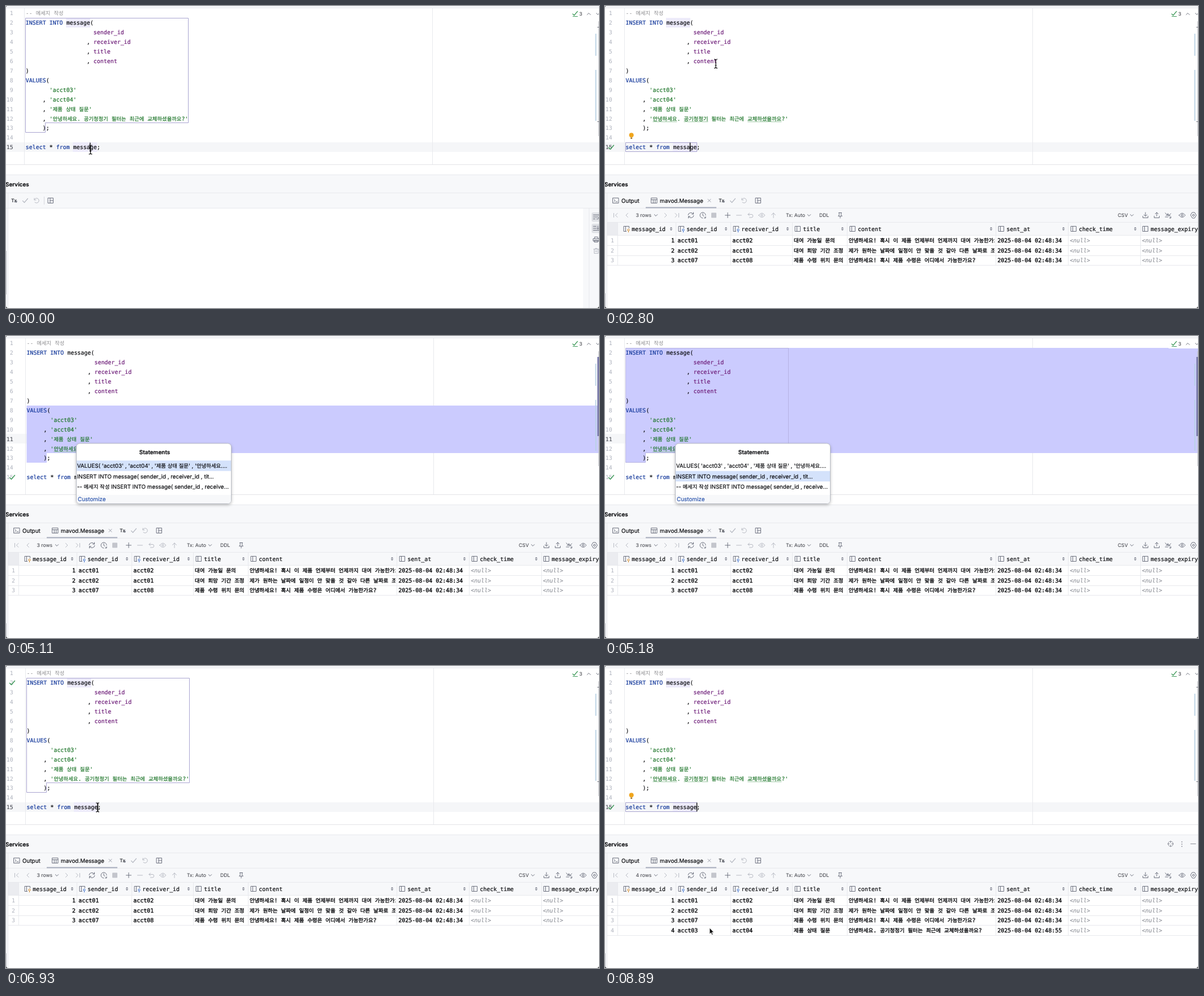
Write an HTML page that moves like this. It is 1049 px wide and 534 px high and loops after 8960 ms.

```html
<!DOCTYPE html>
<html lang="ko">
<head>
<meta charset="utf-8">
<title>SQL console</title>
<style>
html, body { margin: 0; width: 100%; height: 100%; overflow: hidden; background: #fff; }
svg { display: block; position: absolute; left: 0; top: 0; }
text {
  white-space: pre; text-rendering: geometricPrecision; color: #0c0d10;
  fill: currentColor; stroke: currentColor; stroke-width: .2px;
  font: 9.967px "DejaVu Sans Mono", monospace;
}
.ui { font: 9.9px Inter, sans-serif; }
.small { font: 8.7px Inter, sans-serif; color: #33353c; stroke-width: 0; }
.bold { font: 600 9.9px Inter, sans-serif; }
.ko { font-family: "Noto Sans CJK KR", "Noto Sans CJK JP", sans-serif; font-size: 9.35px; }
.cells text { stroke-width: .38px; }
.cells .ko { font-size: 9.45px; }
.kw { color: #12379a; }
.str { color: #1d7529; }
.col { color: #6d1c78; }
text.com { color: #8b8b8e; stroke-width: 0; }
text.num { color: #aeb2bd; stroke-width: 0; }
.now { color: #53565f; }
text.null { color: #8d9098; font-style: italic; stroke-width: .1px; }
.link { color: #2d56ae; }
.end { text-anchor: end; }
.mid { text-anchor: middle; }
</style>
</head>
<body>
<svg width="1049" height="534" viewBox="0 0 1049 534">
  <g id="scene"></g>
  <g id="pointer"></g>
</svg>
<script>
const LOOP = 8960, TICK = 70, CW = 6, HANGUL = 8.6;
const PANEL = '#f7f8fa', EDGE = '#e8e9ed', DARK = '#6c707e', DIM = '#b7bac3', GREEN = '#3f9a5a';
const SELECTED = '#cbcbfe', LILAC = '#edebfa', FRAME = '#a9a4d0';

const rowTop = n => 4 + (n - 1) * 16.93;
const rowEdge = n => Math.round(rowTop(n));
const rect = (x, y, w, h, fill, more = '') =>
  `<rect x="${x}" y="${y}" width="${w}" height="${h}" fill="${fill}" ${more}/>`;
const hline = (x, y, w, c = EDGE) => rect(x, y, w, 1, c);
const vline = (x, y, h, c = EDGE) => rect(x, y, 1, h, c);
const rich = s => s.replace(/&/g, '&amp;').replace(/</g, '&lt;')
  .replace(/[가-힣]+/g, '<tspan class="ko">$&</tspan>');
const text = (x, y, s, cls = '', more = '') => `<text x="${x}" y="${y}" class="${cls}" ${more}>${rich(s)}</text>`;
const icon = (x, y, d, c = DARK, w = 1, fill = 'none') =>
  `<path transform="translate(${x} ${y})" d="${d}" fill="${fill}" stroke="${c}" stroke-width="${w}" stroke-linecap="round" stroke-linejoin="round"/>`;

const ICON = {
  check: 'M-4.5 .5L-1.5 3.5L4.5 -3.5',
  undo: 'M-4 -4V-1H-1M-4 -1.2A4.2 4.2 0 1 1 -3 3',
  back: 'M-2 -4L-4.5 -1.5L-2 1M-4.5 -1.5H1.5A2.6 2.6 0 0 1 1.5 4H-2',
  layout: 'M-4.5 -4.5H4.5V4.5H-4.5ZM-1 -4.5V4.5M-1 0H4.5',
  table: 'M-5 -4.5H5V4.5H-5ZM-5 -1.5H5M-1.7 -1.5V4.5M1.7 -1.5V4.5',
  output: 'M-5 -4.5H5V4.5H-5ZM-3 -2L-1 0L-3 2M0 2H3',
  close: 'M-2.5 -2.5L2.5 2.5M2.5 -2.5L-2.5 2.5',
  down: 'M-2.7 -1.3L0 1.4L2.7 -1.3',
  up: 'M-3 1.5L0 -1.5L3 1.5',
  prev: 'M1.5 -3.5L-2 0L1.5 3.5',
  next: 'M-1.5 -3.5L2 0L-1.5 3.5',
  first: 'M-3.5 -3.5V3.5M3 -3.5L-.5 0L3 3.5',
  last: 'M3.5 -3.5V3.5M-3 -3.5L.5 0L-3 3.5',
  reload: 'M-5 -.5A5 4.6 0 0 1 4 -2.6M4.5 -5V-2H1.5M5 .5A5 4.6 0 0 1 -4 2.6M-4.5 5V2H-1.5',
  clock: 'M5 0A5 5 0 1 0 0 5M0 -3V.5L2 1.5M3 5H5V3Z',
  plus: 'M-4.5 0H4.5M0 -4.5V4.5',
  minus: 'M-4.5 0H4.5',
  eye: 'M-5.5 0Q0 -7.5 5.5 0Q0 7.5 -5.5 0ZM-1.7 0A1.7 1.7 0 1 0 1.7 0A1.7 1.7 0 1 0 -1.7 0',
  arrow: 'M0 4.5V-4M-3.5 -.5L0 -4L3.5 -.5',
  pin: 'M-2.5 -4.5H2.5M-1.8 -4.5V-.5L-3.5 1.5H3.5L1.8 -.5V-4.5M0 1.5V5',
  load: 'M0 -5V1.5M-2.7 -1L0 1.7L2.7 -1M-4.5 1.5V4.5H4.5V1.5',
  send: 'M0 1.5V-5M-2.7 -2.3L0 -5L2.7 -2.3M-4.5 1.5V4.5H4.5V1.5',
  swap: 'M-5 -4L-.5 0M-.5 -3V0H-3.5M5 -3L1 1M1 -2V1H4M-5 3H0M3 5H5V3Z',
  gear: 'M-2 -5H2L5 0L2 5H-2L-5 0ZM-1.7 0A1.7 1.7 0 1 0 1.7 0A1.7 1.7 0 1 0 -1.7 0',
  target: 'M-4.5 0A4.5 4.5 0 1 0 4.5 0A4.5 4.5 0 1 0 -4.5 0M0 -5V-2M0 5V2M-5 0H-2M5 0H2',
  column: 'M-4.5 -4.5H4.5V4.5H-4.5ZM-1.5 -4.5V4.5',
  sort: 'M-1.5 -1.2L0 -2.7L1.5 -1.2ZM-1.5 1.2L0 2.7L1.5 1.2Z',
  wrap: 'M-5 -3.5H5M-5 0H3.5A2 2 0 0 1 3.5 3.5H1M-5 3.5H-2',
  scroll: 'M-5 -3.5H0M-5 0H0M-5 3.5H5M3 -4V1.5M1 -.5L3 1.5L5 -.5',
  print: 'M-3 -1.5V-4.5H3V-1.5M-5 -1.5H5V2.5H-5ZM-3 1H3V4.5H-3Z',
  trash: 'M-4.5 -3H4.5M-1.5 -3V-4.5H1.5V-3M-3.5 -3V4.5H3.5V-3M-1 -.5V2M1 -.5V2'
};

const TITLE = '제품 상태 질문', BODY = '안녕하세요. 공기청정기 필터는 최근에 교체하셨을까요?';
const CODE = [
  [1, 0, '-- 메세지 작성', 'com'],
  [2, 0, 'INSERT INTO', 'kw'], [2, 12, 'message('],
  [3, 20, 'sender_id', 'col'],
  [4, 18, ','], [4, 20, 'receiver_id', 'col'],
  [5, 18, ','], [5, 20, 'title', 'col'],
  [6, 18, ','], [6, 20, 'content', 'col'],
  [7, 0, ')'],
  [8, 0, 'VALUES', 'kw'], [8, 6, '('],
  [9, 7, "'acct03'", 'str'],
  [10, 5, ','], [10, 7, "'acct04'", 'str'],
  [11, 5, ','], [11, 7, `'${TITLE}'`, 'str'],
  [12, 5, ','], [12, 7, `'${BODY}'`, 'str'],
  [13, 5, ');'],
  [15, 0, 'select', 'kw'], [15, 7, '*'], [15, 9, 'from', 'kw'], [15, 14, 'message;']
];
const SCRIPT = '-- 메세지 작성 INSERT INTO message( sender_id , receive...';
const MENU = {
  insert: [`VALUES( 'acct03' , 'acct04' , '${TITLE}' , '안녕하세요....`,
    'INSERT INTO message( sender_id , receiver_id , tit...', SCRIPT],
  select: ['select * from message', SCRIPT]
};
const COLUMNS = [
  [33, 'message_id', 117, 'key'], [130, 'sender_id', 214, 'key'], [227, 'receiver_id', 323, 'key'],
  [336, 'title', 420], [433, 'content', 683], [696, 'sent_at', 811], [824, 'check_time', 938], [951, 'message_expiry']
];
const ROWS = [
  ['acct01', 'acct02', '대여 가능일 문의', '안녕하세요! 혹시 이 제품 언제부터 언제까지 대여 가능한가요?', '34'],
  ['acct02', 'acct01', '대여 희망 기간 조정', '제가 원하는 날짜에 일정이 안 맞을 것 같아 다른 날짜로 조정', '34'],
  ['acct07', 'acct08', '제품 수령 위치 문의', '안녕하세요! 혹시 제품 수령은 어디에서 가능한가요?', '34'],
  ['acct03', 'acct04', TITLE, BODY, '55']
];

// Each step changes only the named parts of the state.
const END_1 = 114, END_2 = 126, IN_TITLE = 7 * CW + CW + 4 * HANGUL + CW;
const STEPS = [
  [0, { dx: 0, row: 15, box: 'insert', caret: END_1, sel: '', menu: '', pick: 0, tick: 0, rows: 0, bulb: 0, hover: 0 }],
  [140, { box: 'select' }],
  [700, { bulb: 1 }],
  [980, { caret: 0 }],
  [1260, { bulb: 0, box: '', sel: 'select', menu: 'select', menuX: 149 }],
  [1680, { menu: '' }],
  [1750, { sel: '', box: 'select', caret: END_1 }],
  [1960, { dx: 1.7, rows: 3, tick: 15 }],
  [2240, { caret: 0 }],
  [2590, { bulb: 1 }],
  [2800, { caret: END_1 }],
  [3290, { caret: 0 }],
  [3850, { caret: END_1 }],
  [4130, { row: 11, caret: IN_TITLE, bulb: 0 }],
  [5110, { box: '', sel: 'values', menu: 'insert', menuX: 124.5, caret: 0 }],
  [5180, { sel: 'insert', pick: 1 }],
  [5670, { menu: '', pick: 0 }],
  [5740, { sel: '', box: 'insert', tick: 2, caret: IN_TITLE }],
  [6650, { row: 15, caret: END_2 }],
  [7280, { box: '', sel: 'select', menu: 'select', menuX: 162, caret: 0 }],
  [7910, { menu: '' }],
  [7980, { sel: '', box: 'select', caret: END_2, tick: 0 }],
  [8120, { tick: 15, rows: 4 }],
  [8540, { hover: 1 }],
  [8680, { bulb: 1 }]
];

// Pointer runs: shape, end time, then [time, x, y] points.
const RUNS = [
  ['beam', 280, [0, 149.5, 254]],
  ['beam', 1260, [980, 100, 187]],
  ['beam', 4550, [2800, 196, 102], [3360, 160, 150], [3850, 126, 178]],
  ['beam', 7280, [6300, 126, 180], [6580, 162, 250]],
  ['arrow', LOOP, [8470, 162, 300], [8680, 182, 476], [8820, 185, 463]]
];
const CLICKS = [[4130, 4410], [6650, 6860]];

function outline(x, kind) {
  const d = kind === 'insert' ? `M${x} 21.5H${x + 288}V206.5H${x + 35}V223.5H${x}Z` : `M${x} 241.5H${x + 126}V257.5H${x}Z`;
  return `<path d="${d}" fill="none" stroke="${FRAME}"/>`;
}

function selection(x, kind) {
  if (kind === 'select') return rect(x, 241, 126, 17, SELECTED) + outline(x, kind);
  const top = rowEdge(kind === 'insert' ? 2 : 8);
  return rect(x, top, 1049 - x, 207 - top, SELECTED) + rect(x, 207, 35.5, 17, SELECTED) +
    (kind === 'insert' ? `<g opacity=".6">${outline(x, kind)}</g>` : '');
}

function editor(s) {
  const x0 = 34.7 + s.dx, left = Math.floor(x0) + .5, shift = Math.round(s.dx);
  const mark = (row, col, len) => rect(x0 + col * CW - .5, rowEdge(row), len * CW + 1, 17, LILAC);
  let out = rect(0, rowEdge(s.row), 1049, 17, '#f5f6f8');
  out += vline(32 + shift, 4, 276) + vline(754 + shift, 4, 276);
  if (s.row === 15) out += mark(2, 12, 7) + mark(15, 14, 7);
  else if (!s.sel) out += mark(5, 20, 5);
  if (s.sel) out += selection(left, s.sel);
  for (let n = 1; n <= 15; n++)
    out += text(12.8, rowTop(n) + 12.3, String(n), 'end ' + (n === s.row ? 'now' : 'num'));
  for (const [row, col, str, cls] of CODE) out += text(x0 + col * CW, rowTop(row) + 12.3, str, cls);
  if (s.box !== 'insert')
    for (const [x, n] of [[48, 5], [103, 5], [215.8, 7]]) out += rect(x0 + x, 204.4, n * HANGUL, .8, '#83b98b');
  if (s.box) out += outline(left, s.box);
  if (s.tick) out += icon(11, rowTop(s.tick) + 8.8, ICON.check, GREEN, 1.5);
  if (s.bulb) out += `<circle cx="${45 + s.dx}" cy="228.3" r="4" fill="#f0a51c"/>` + rect(43.5 + s.dx, 232.4, 3, 2.6, '#a17b3a');
  if (s.caret) out += rect(x0 + s.caret - .5, rowTop(s.row) + .6, 1.3, 15.6, '#000');
  return out + stripe(s);
}

function stripe(s) {
  let out = s.menu ? rect(997, 4, 52, 18, '#fff') : '';
  out += icon(1005.5, 14, 'M-3 0L-.5 2.5L5.5 -4.5M-2.5 4.5H5.5', GREEN, 1.2);
  out += text(1014, 17.3, '3', 'small') + icon(1031, 14, ICON.up) + icon(1047, 14, ICON.down);
  out += rect(1042.5, 49, 1.8, 39, '#b9d2e4') + rect(1042.5, 113, 1.8, 90, '#b9d2e4') + vline(1048, 27, 203, '#c6c7cb');
  if (s.sel === 'insert' || s.sel === 'values') return out + rect(1046, 37, 3, 140, '#7f80ad');
  return out + (s.row === 15 ? hline(1046, 37, 3, '#777a83') + hline(1046, 204, 3, '#777a83') : hline(1046, 75, 3, '#9a94cf'));
}

function services(s) {
  let out = hline(0, 280, 1049, '#e3e4e8') + rect(0, 298, 1049, 60, PANEL);
  for (const y of [298, 330, 357]) out += hline(0, y, 1049);
  out += text(-1, 318.6, 'Services', 'bold');
  if (s.hover) {
    const soft = '#8b8e98';
    out += icon(1000.5, 314.5, ICON.target, soft) + icon(1040.5, 314.5, ICON.minus, soft);
    for (const y of [311, 315, 319]) out += `<circle cx="1020.5" cy="${y}" r=".9" fill="${soft}"/>`;
  }
  const x = s.rows ? 192 : 0;
  out += text(x + 9, 347, 'Tx', 'small', 'style="font-weight:600"') + icon(x + 18, 345, 'M-1 2H1V0Z');
  out += icon(x + 34, 344, ICON.check, DIM, 1.2) + icon(x + 54, 344, ICON.undo, DIM) + icon(x + 79, 344, ICON.layout);
  return out + (s.rows ? tabs() + grid(s.rows) : blank());
}

function blank() {
  let out = vline(67, 337, 14, '#d6d8de') + rect(0, 358, 3, 176, PANEL) + vline(3, 331, 203);
  out += rect(1021, 358, 28, 176, PANEL) + vline(1031, 358, 176) + rect(0, 433, 1, 77, '#c3c5ca');
  for (const y of [365, 385]) out += rect(1036, y, 18, 16.5, '#dfe1e5', 'rx="3"');
  return out + icon(1044, 373, ICON.wrap) + icon(1044, 393, ICON.scroll) +
    icon(1044, 413, ICON.print) + icon(1044, 433, ICON.trash, DIM);
}

function tabs() {
  return icon(19, 344, ICON.output) + text(29, 347.6, 'Output', 'ui') +
    icon(87, 344, ICON.table) + text(97, 347.6, 'mavod.Message', 'ui') +
    icon(184.5, 344, ICON.close, '#9a9daa') + rect(72, 355.5, 125, 2, '#a8adbd');
}

function toolbar(count) {
  const set = (c, list) => list.map(([x, name]) => icon(x, 370, ICON[name], c)).join('');
  return rect(4, 358, 1045, 24, PANEL) +
    set(DIM, [[19, 'first'], [39, 'prev'], [107, 'next'], [127, 'last'], [237, 'minus'], [257.5, 'back'], [277.5, 'eye'], [298, 'arrow']]) +
    set(DARK, [[90, 'down'], [152, 'reload'], [173, 'clock'], [217, 'plus'], [361, 'down'], [416, 'pin'], [932, 'down'],
      [956, 'load'], [976, 'send'], [996, 'swap'], [1021, 'eye'], [1041, 'gear']]) +
    rect(188, 365.5, 9, 9, '#c3c5cc', 'rx="1"') + text(54.5, 373.2, count + ' rows', 'small') +
    text(320, 373.2, 'Tx: Auto', 'small') + text(379, 373.2, 'DDL', 'small') + text(907, 373.2, 'CSV', 'small');
}

function grid(count) {
  const bottom = 405 + count * 17.8;
  let out = toolbar(count) + rect(0, 358, 3, 176, PANEL) + vline(3, 331, 203) + rect(0, 508, 1, 26, '#c3c5ca');
  out += rect(4, 382, 1045, 23, PANEL) + rect(4, 383, 19, 22, '#ebecf0') + hline(4, 382, 1045);
  for (let i = 0; i <= count; i++) out += hline(4, Math.round(405 + i * 17.8), 1045);
  for (const x of [22, 125, 222, 331, 428, 691, 819, 947]) out += vline(x, 382, bottom - 382);
  COLUMNS.forEach(([x, name, sort, key], i) => {
    out += icon(x + 5, 394, ICON.column);
    if (key) out += rect(x + 5, 393, 7, 7, PANEL) + icon(x + 8.5, 396, 'M-1.7 0A1.7 1.7 0 1 0 1.7 0A1.7 1.7 0 1 0 -1.7 0M0 1.8V4', i ? '#4878d0' : '#d8943a');
    out += text(x + 14.2, 397.8, name);
    if (sort) out += icon(sort, 394, ICON.sort, DARK, .6, DARK);
  });
  out += '<g class="cells">';
  ROWS.slice(0, count).forEach(([from, to, title, body, sec], i) => {
    const y = 417.8 + i * 17.8, n = String(i + 1);
    out += text(10, y, n, 'num') + text(123, y, n, 'end') + text(128.3, y, from) + text(225.3, y, to);
    out += text(334, y, title) + text(431, y, body, '', 'clip-path="url(#cell)"') + text(694.3, y, '2025-08-04 02:48:' + sec);
    out += text(822.3, y, '<null>', 'null') + text(949.8, y, '<null>', 'null');
  });
  return out + '</g>';
}

function menu(s) {
  const list = MENU[s.menu], x = s.menuX, top = s.menu === 'insert' ? 190 : 258;
  const w = 274, h = 51 + 18.5 * list.length, foot = top + h - 15.5;
  let out = rect(x, top, w, h, '#fff', 'rx="6" stroke="#b9bcc4" filter="url(#shade)"');
  out += text(x + w / 2 + 1.5, top + 19.4, 'Statements', 'bold mid');
  list.forEach((item, i) => {
    const y = top + 30.2 + i * 18.5;
    if (i === s.pick) out += rect(x + .5, y, w - 1, 18.5, '#d4e2fb');
    out += text(x + 1.2, y + 12.8, item, 'ui', 'style="font-size:9.8px"');
  });
  out += `<path d="M${x + .5} ${foot}h${w - 1}v9q0 6 -6 6h${13 - w}q-6 0 -6 -6z" fill="${PANEL}"/>`;
  return out + text(x + 2.5, foot + 11.2, 'Customize', 'ui link');
}

const DEFS = `<defs><clipPath id="cell"><rect x="429" y="400" width="260" height="90"/></clipPath>
  <filter id="shade" x="-10%" y="-20%" width="120%" height="140%"><feDropShadow dx="0" dy="2" stdDeviation="2.5" flood-opacity=".25"/></filter></defs>`;
const CORNERS = '<path d="M0 530V534H4Q0 534 0 530ZM1049 530V534H1045Q1049 534 1049 530ZM0 2V0H2Q0 0 0 2Z" fill="#222"/>';

function scene(s) {
  return DEFS + rect(0, 0, 1049, 3, PANEL) + hline(0, 3, 1049) + editor(s) + services(s) + (s.menu ? menu(s) : '') + CORNERS;
}

const SHAPE = {
  beam: '<path d="M-3 -8Q0 -8 0 -6Q0 -8 3 -8M0 -6V6M-3 8Q0 8 0 6Q0 8 3 8M-1.5 3H1.5" fill="none" stroke="#111" stroke-width="1.2"/>',
  arrow: '<path d="M0 0V11L2.5 8.7L4.2 12.5L6 11.7L4.3 8H7.6Z" fill="#111" stroke="#fff" stroke-width=".8"/>'
};

function pointer(t) {
  const run = RUNS.find(([, end, first]) => t >= first[0] && t < end);
  if (!run) return '';
  const [shape, , ...pts] = run;
  let [, x, y] = pts[pts.length - 1];
  const i = pts.findIndex(p => p[0] > t);
  if (i > 0) {
    const [a, b] = [pts[i - 1], pts[i]];
    const k = (t - a[0]) / (b[0] - a[0]), e = k * k * (3 - 2 * k);
    x = a[1] + (b[1] - a[1]) * e;
    y = a[2] + (b[2] - a[2]) * e;
  }
  const ring = CLICKS.some(([a, b]) => t >= a && t < b) ? '<circle r="12.7" fill="none" stroke="#111" stroke-width="1.4"/>' : '';
  return `<g transform="translate(${x} ${y})">${SHAPE[shape]}${ring}</g>`;
}

let state = {};
const scenes = STEPS.map(([, change]) => scene(state = { ...state, ...change }));
const [sceneEl, pointerEl] = ['scene', 'pointer'].map(id => document.getElementById(id));
const start = performance.now();
let shown = -1, lastTick = -1;

function draw() {
  const t = Math.floor(((performance.now() - start) % LOOP) / TICK) * TICK;
  if (t !== lastTick) {
    lastTick = t;
    const i = STEPS.filter(([at]) => at <= t).length - 1;
    if (i !== shown) sceneEl.innerHTML = scenes[shown = i];
    pointerEl.innerHTML = pointer(t);
  }
  requestAnimationFrame(draw);
}
draw();
</script>
</body>
</html>
```
